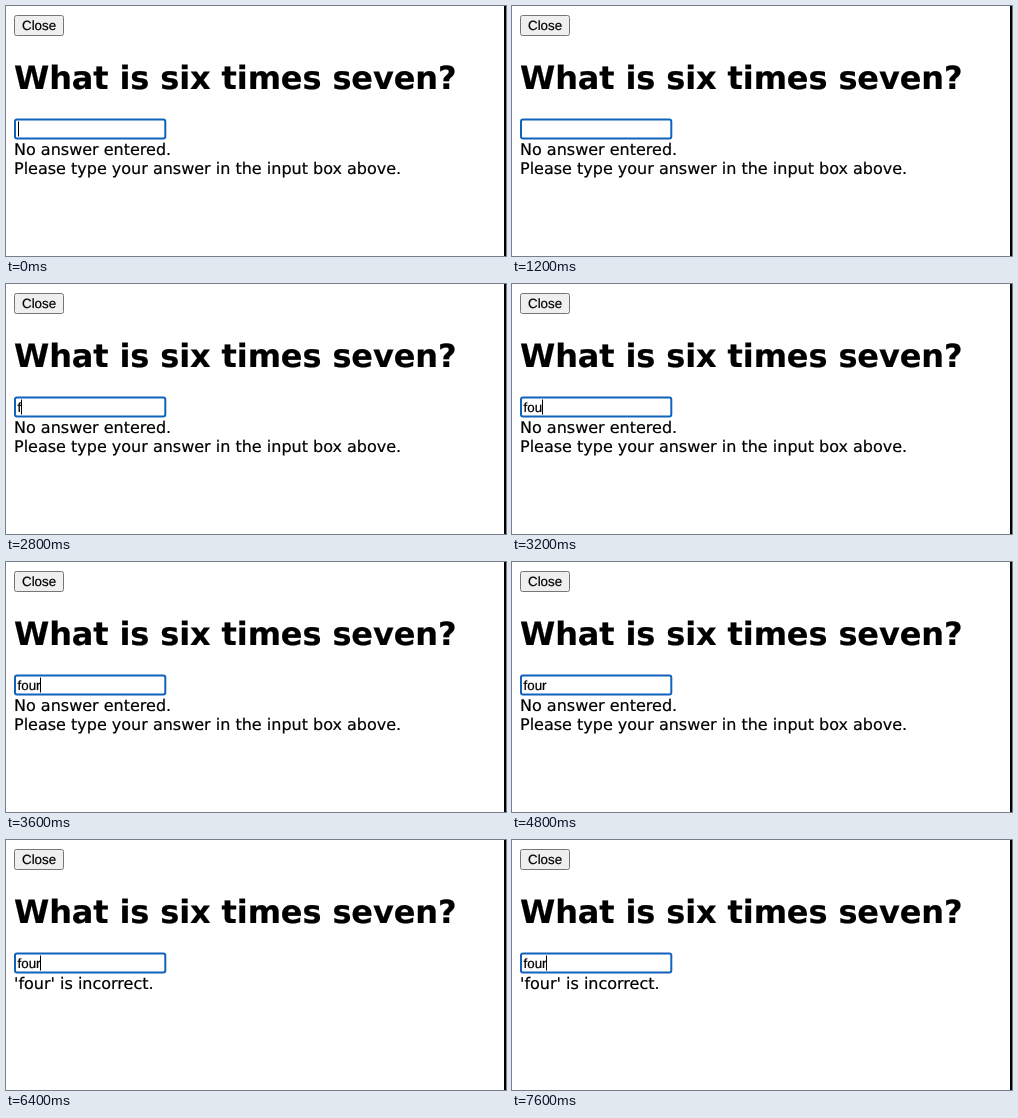
These frames come from a looping animation (500 by 250 pixels, 8000 ms). An HTML page:

```html
<!DOCTYPE html>
<html lang="en">
<head>
<meta charset="utf-8">
<title>Quiz form</title>
<style>
  html, body { margin: 0; width: 100%; height: 100%; overflow: hidden; background: #fff; }
  svg { display: block; }
  text {
    font: 16px Verdana, "DejaVu Sans", sans-serif;
    text-rendering: geometricPrecision;
    stroke: #000;
    stroke-width: .2px;
  }
  .title { font-size: 32px; font-weight: bold; letter-spacing: -.12px; }
  .control { font: 13.333px Arial, "Liberation Sans", sans-serif; }
</style>
</head>
<body>
<svg width="500" height="250" viewBox="0 0 500 250">
  <rect x="498" width="2" height="250"/>
  <rect x="8.5" y="9.5" width="49" height="20" rx="2" fill="#efefef" stroke="#767676"/>
  <text class="control" x="16" y="24">Close</text>
  <text class="title" x="8" y="82.5">What is six times seven?</text>
  <rect x="9" y="113.5" width="150.3" height="19" rx="2" fill="#fff" stroke="#1062bd" stroke-width="2"/>
  <text class="control" id="entry" x="11.6" y="127.7"></text>
  <rect id="caret" y="115.5" width="1" height="15"/>
  <text id="line1" x="8" y="149"></text>
  <text id="line2" x="8" y="168"></text>
</svg>
<script>
  const LOOP = 8000, SUBMIT = 6400;
  const typed = [[0, ""], [2800, "f"], [3200, "fou"], [3600, "four"]];
  const caretOff = [[1200, 2000], [4800, 5600], [6800, 7600]];
  const caretX = { "": 12, f: 15, fou: 30, four: 34 };
  const el = id => document.getElementById(id);
  const [entry, caret, line1, line2] = ["entry", "caret", "line1", "line2"].map(el);

  function draw(now) {
    const t = now % LOOP;
    const word = typed.filter(([start]) => t >= start).pop()[1];
    const sent = t >= SUBMIT;
    const hidden = caretOff.some(([from, to]) => t >= from && t < to);
    entry.textContent = word;
    caret.setAttribute("x", caretX[word]);
    caret.setAttribute("visibility", hidden ? "hidden" : "visible");
    line1.textContent = sent ? `'${word}' is incorrect.` : "No answer entered.";
    line2.textContent = sent ? "" : "Please type your answer in the input box above.";
  }

  function tick() {
    draw(performance.now());
    requestAnimationFrame(tick);
  }
  tick();
</script>
</body>
</html>
```
